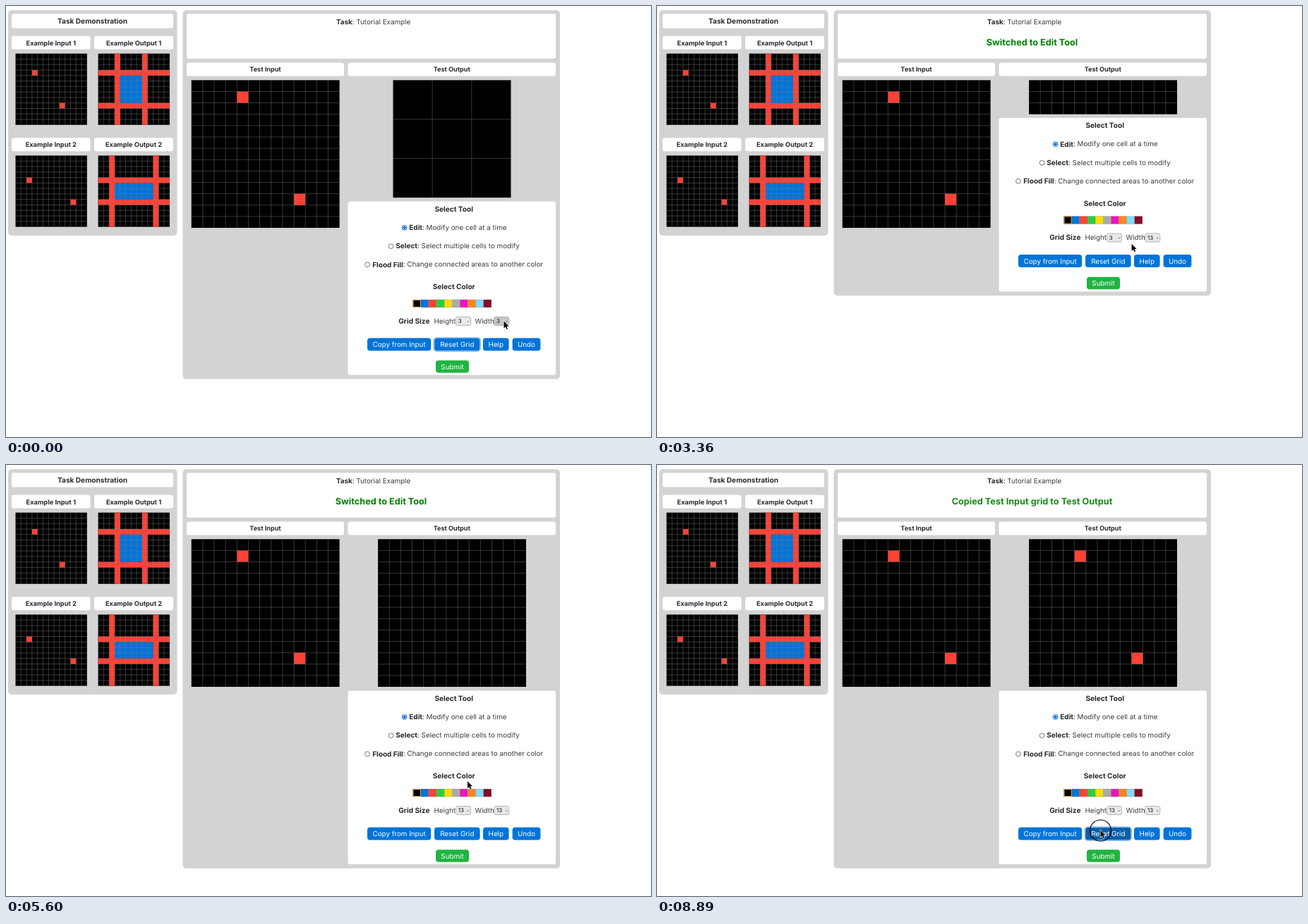
Write an HTML page that moves like this. It is 914x612 px and loops after 8.96 s.

```html
<!DOCTYPE html>
<html lang="en">
<head>
<meta charset="utf-8">
<title>Grid editor tutorial</title>
<style>
html, body { margin: 0; width: 100%; height: 100%; overflow: hidden; background: #fff; }
svg { display: block; font-family: Inter, Roboto, sans-serif; font-size: 9.83px; fill: #383c42; text-rendering: geometricPrecision; }
.b { font-weight: 700; fill: #262b30; }
.pop { filter: drop-shadow(0 2px 4px rgba(0,0,0,.35)); }
</style>
</head>
<body>
<svg width="914" height="612" viewBox="0 0 914 612" xmlns="http://www.w3.org/2000/svg">
  <defs>
    <linearGradient id="shadeW" x1="0" y1="0" x2="0" y2="1">
      <stop offset="0" stop-color="#bcbcbc"/><stop offset=".2" stop-color="#cacaca"/>
      <stop offset=".38" stop-color="#e4e4e4"/><stop offset="1" stop-color="#e8e8e8"/>
    </linearGradient>
    <linearGradient id="shadeH" x1="0" y1="0" x2="0" y2="1">
      <stop offset="0" stop-color="#e2e3e3"/><stop offset=".2" stop-color="#e1e5e4"/>
      <stop offset=".34" stop-color="#d3e6e3"/><stop offset=".48" stop-color="#d9e6e4"/>
      <stop offset=".62" stop-color="#e7e7e7"/><stop offset="1" stop-color="#e8e8e8"/>
    </linearGradient>
    <clipPath id="list"><rect width="35.5" height="236.5"/></clipPath>
  </defs>
  <g id="fixed"></g>
  <g id="live"></g>
</svg>
<script>
const LOOP = 8960, STEP = 70;
const BLUE = '#0074D9', RED = '#FF4136';
const COLORS = ['#000', BLUE, RED, '#2ECC40', '#FFDC00', '#AAA', '#F012BE', '#FF851B', '#7FDBFF', '#870C25'];

// cursor tip: time, x, y
const PATH = [
  [0, 705.5, 447.5], [210, 705.5, 447.5], [420, 701.5, 446], [1400, 701.5, 446],
  [1610, 709, 331], [1890, 709, 331], [2170, 711, 362], [2310, 711, 362],
  [2520, 711, 347], [2660, 712, 354], [3010, 712, 354], [3570, 649, 328],
  [4200, 649, 328], [4410, 665.5, 371.5], [4550, 665.5, 374], [4970, 654, 449],
  [5880, 654, 449], [6020, 654, 449.5], [6160, 654, 449.5], [6650, 580.5, 518],
  [7350, 580.5, 518], [7420, 582, 518], [7560, 582, 518], [7630, 607, 517],
  [7840, 628.5, 518.5], [LOOP, 628.5, 518.5]
];
const CLICKS = [[910, 980], [3710, 3780], [6790, 6930], [8820, LOOP]];
const MENUS = [
  { x: 691.5, y: 202, open: 980, moved: 1470, pick: 2800, shade: 'shadeW' },
  { x: 637.5, y: 295.5, open: 3780, moved: 3780, pick: 5180, shade: 'shadeH' }
];
const WIDE = 2940, TALL = 5320, COPIED = 6930;
const MESSAGES = [[COPIED, 'Copied Test Input grid to Test Output'], [TALL, 'Switched to Edit Tool'], [WIDE, 'Switched to Edit Tool']];
const BUTTONS = [
  ['Copy from Input', 512, 90.2], ['Reset Grid', 607, 64.6], ['Help', 676, 36.6], ['Undo', 717.6, 39.8]
];

const rect = (x, y, w, h, fill, r = 0, more = '') =>
  `<rect x="${x}" y="${y}" width="${w}" height="${h}" rx="${r}" fill="${fill}" ${more}/>`;
const text = (s, x, cy, { size = 9.83, bold, anchor = 'middle', fill } = {}) =>
  `<text x="${x}" y="${cy + size * .36}" text-anchor="${anchor}" style="font-size:${size}px${fill ? ';fill:' + fill : ''}"${bold ? ' class="b"' : ''}>${s}</text>`;
const card = (x, y, w, h, label, size) =>
  rect(x, y, w, h, '#fff', 3) + (label ? text(label, x + w / 2, y + h / 2 + .2, { size, bold: true }) : '');

// blocks: [column, row, columns, rows, colour]
function grid(x, y, w, h, cols, rows, blocks = []) {
  const cw = w / cols, ch = h / rows;
  let lines = '';
  for (let i = 1; i < cols; i++) lines += `M${x + i * cw} ${y}v${h}`;
  for (let i = 1; i < rows; i++) lines += `M${x} ${y + i * ch}h${w}`;
  return rect(x, y, w, h, '#000') +
    blocks.map(([c, r, n, m, f]) => rect(x + c * cw, y + r * ch, n * cw, m * ch, f)).join('') +
    `<path d="${lines}" fill="none" stroke="#808080" stroke-opacity=".65" stroke-width=".65"/>`;
}
const dots = (...cells) => cells.map(([c, r]) => [c, r, 1, 1, RED]);
function cross([a, b], [c, d]) {
  return [[a, 0, 1, 13, RED], [c, 0, 1, 13, RED], [0, b, 13, 1, RED], [0, d, 13, 1, RED],
    [a + 1, b + 1, c - a - 1, d - b - 1, BLUE]];
}

function leftPanel() {
  let out = rect(3, 6, 239.5, 320, '#d3d3d3', 5) + card(8, 11, 229, 20.5, 'Task Demonstration', 10.1);
  [[[3, 3], [8, 9]], [[2, 4], [10, 8]]].forEach((pair, i) => {
    const y = 42.5 + i * 144.8;
    out += card(8, y, 111.5, 19, 'Example Input ' + (i + 1), 9.25) +
      card(125, y, 112, 19, 'Example Output ' + (i + 1), 9.25) +
      grid(13.5, y + 25.1, 101.3, 101.2, 13, 13, dots(...pair)) +
      grid(130.6, y + 25.1, 101.3, 101.2, 13, 13, cross(...pair));
  });
  return out;
}

const TEST = dots([4, 1], [9, 10]);

function cursorAt(t) {
  const i = Math.max(1, PATH.findIndex(p => p[0] >= t));
  const [t0, x0, y0] = PATH[i - 1], [t1, x1, y1] = PATH[i];
  const p = (t - t0) / (t1 - t0);
  return [x0 + (x1 - x0) * p, y0 + (y1 - y0) * p];
}

function picker(x, value, dark) {
  return rect(x, 441.5, 21, 12, dark ? '#c6c6c9' : '#e9e9ed', 2.2, 'stroke="#9a9aa2" stroke-width=".7"') +
    text(value, x + 3.2, 447.6, { size: 8, anchor: 'start', fill: '#111' }) +
    `<path d="M${x + 16} 447.3l1.4 1.3 1.4-1.3" fill="none" stroke="#444" stroke-width=".7"/>`;
}

function button(label, x, y, w, h, fill, ring) {
  return rect(x, y, w, h, fill, 3.8) +
    (ring ? rect(x - .5, y - .5, w + 1, h + 1, 'none', 4.2, 'stroke="#7fb9ec" stroke-width="1.8"') : '') +
    text(label, x + w / 2, y + h / 2 + .1, { fill: '#fff' });
}

function tool(x, cy, name, x2, note, on) {
  const dot = on
    ? `<circle cx="${x}" cy="${cy + .4}" r="3.4" fill="#fff" stroke="#0068d6" stroke-width="1"/><circle cx="${x}" cy="${cy + .4}" r="2.1" fill="#0068d6"/>`
    : `<circle cx="${x}" cy="${cy + .4}" r="3.4" fill="#fff" stroke="#75757c" stroke-width="1"/>`;
  return dot + text(name, x2, cy, { size: 10, bold: true, anchor: 'end' }) +
    text(': ' + note, x2, cy, { anchor: 'start' });
}

function tools(t, dy, [cx, cy], press) {
  const focus = t < 910 || t >= 8820 ? 1 : t >= 6790 ? 0 : -1;
  let out = rect(484.5, 277.5, 294.5, 246.5, '#fff', 3) +
    text('Select Tool', 634.7, 288, { size: 10.1, bold: true }) +
    tool(564.6, 314.4, 'Edit', 590, 'Modify one cell at a time', true) +
    tool(545.5, 340.8, 'Select', 583, 'Select multiple cells to modify') +
    tool(512, 366.9, 'Flood Fill', 562.7, 'Change connected areas to another color') +
    text('Select Color', 634.7, 398.4, { size: 10.1, bold: true });
  COLORS.forEach((c, i) => out += rect(576.6 + i * 11.13, 417, 11.13, 11, c, 0, 'stroke="#888" stroke-width=".3"'));
  out += rect(577.1, 417.5, 10.2, 10, 'none', 0, 'stroke="#e8a33a" stroke-width="1"') +
    text('Grid Size', 556.3, 447, { size: 10.1, bold: true, anchor: 'start' }) +
    text('Height', 606.5, 447, { anchor: 'start' }) + text('Width', 664.5, 447, { anchor: 'start' }) +
    picker(637.5, t < TALL ? 3 : 13, t >= 3570 && t < TALL) +
    picker(691.8, t < WIDE ? 3 : 13, t < WIDE);
  BUTTONS.forEach(([label, x, w], i) => {
    const hover = cx > x + .5 && cx < x + w && cy > 472 + dy && cy < 489.5 + dy;
    out += button(label, x, 471.6, w, 18, hover ? press ? '#0a5fa9' : '#0069c5' : BLUE, i === focus);
  });
  out += button('Submit', 609, 503.2, 47, 17.6, '#20b441');
  return `<g transform="translate(0 ${dy})">${out}</g>`;
}

function menu(m, t, [cx, cy]) {
  if (t < m.open || t >= m.pick + 210) return '';
  let hot = Math.floor((cy - m.y - 3.5) / 12) + 1;
  const overBar = cx > m.x + 25;
  if (t < m.moved) hot = 3;
  else if (overBar || hot > 19) hot = 0;
  const flash = t === m.pick;
  let items = '';
  if (hot) items += rect(0, hot * 12 - 8.5, 35.5, 12, flash ? '#4aa3f5' : '#0b79dd');
  for (let n = 1; n <= 20; n++) {
    const fill = n === hot ? flash ? '#3c4650' : '#fff' : '#1a1a1a';
    const y = n * 12 - 2.5;
    items += text(n, 12, y, { size: 8, anchor: 'start', fill });
    if (n === 3) items += `<path d="M4 ${y + .3}l1.7 2.3 3-4.9" fill="none" stroke="${fill}" stroke-width="1"/>`;
  }
  const wide = m === MENUS[1] && t >= 4340;
  const bar = wide ? rect(25.7, 4, 7.8, 142, '#767676', 3.9) : rect(28, 4, 5, 142, '#7b7b7b', 2.5);
  const alpha = t >= m.pick + 140 ? .4 : 1;
  return `<g transform="translate(${m.x} ${m.y})" opacity="${alpha}">` +
    `<g class="pop">${rect(0, 0, 35.5, 239.8, `url(#${m.shade})`, 4)}</g>` +
    `<g clip-path="url(#list)">${items}</g>${bar}</g>`;
}

function draw(t) {
  const tip = cursorAt(t);
  const press = CLICKS.some(([a, b]) => t >= a && t < b);
  const dy = t < WIDE ? 0 : t < TALL ? -118.5 : 43;
  let out = rect(250.5, 6, 534.5, 523.7 + dy, '#d3d3d3', 5) + card(256, 11, 523, 63.7) +
    `<text x="520.6" y="26" text-anchor="middle"><tspan class="b">Task</tspan>: Tutorial Example</text>` +
    card(256, 80.5, 223, 19, 'Test Input', 9.1) + card(484.5, 80.5, 294.5, 19, 'Test Output', 9.1) +
    grid(262.7, 105.3, 209.9, 209.7, 13, 13, TEST);
  const msg = MESSAGES.find(m => t >= m[0]);
  if (msg) {
    const fade = .5 + Math.cos(Math.PI * (t - msg[0]) / 10000) / 2;
    out += `<g opacity="${fade}">${text(msg[1], 531.5, 51.5, { size: 12.7, bold: true, fill: '#008000' })}</g>`;
  }
  out += t < WIDE ? grid(548.5, 105.3, 167, 166.8, 3, 3)
    : t < TALL ? grid(527.1, 105.3, 209.9, 48.4, 13, 3)
    : grid(527.1, 105.3, 209.9, 209.7, 13, 13, t < COPIED ? [] : TEST);
  out += tools(t, dy, tip, press) + MENUS.map(m => menu(m, t, tip)).join('');
  if (press) out += `<circle cx="${tip[0]}" cy="${tip[1] + .5}" r="15" fill="none" stroke="#000" stroke-width="1.2"/>`;
  out += `<path transform="translate(${tip})" d="M0 0V10L2.3 7.9 3.8 11.4 5.4 10.7 3.9 7.3H7Z" fill="#000" stroke="#fff" stroke-width="1.3" paint-order="stroke"/>`;
  live.innerHTML = out;
}

const live = document.getElementById('live');
document.getElementById('fixed').innerHTML = leftPanel();
const start = performance.now();
let last = -1;
function tick() {
  const t = Math.floor((performance.now() - start) % LOOP / STEP) * STEP;
  if (t !== last) draw(last = t);
  requestAnimationFrame(tick);
}
tick();
</script>
</body>
</html>
```
